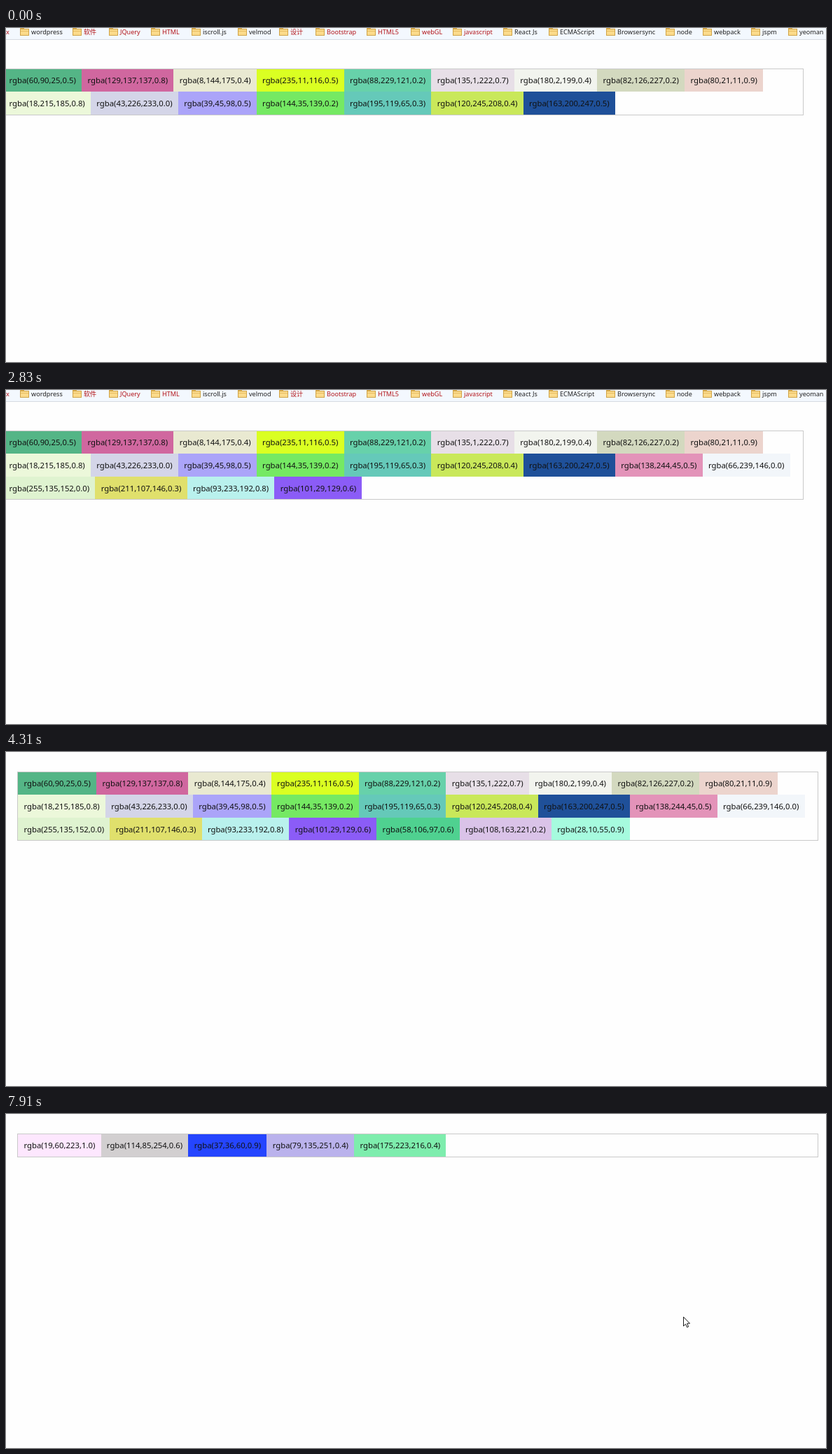
Recreate the animation shown at these times as an HTML page with a canvas. Size 1171 px wide and 478 px high, loop 7990 ms.

```html
<!DOCTYPE html>
<html lang="en">
<head>
<meta charset="utf-8">
<title>Colour tiles</title>
<style>
  html, body { margin: 0; width: 100%; height: 100%; overflow: hidden; background: #fefefe; }
  canvas { display: block; }
</style>
</head>
<body>
<canvas id="stage" width="1171" height="478"></canvas>
<script>
const ctx = document.getElementById('stage').getContext('2d');
const LOOP = 7990;
const SANS = '"Noto Sans", "Noto Sans CJK SC", "Noto Sans CJK", "Open Sans", sans-serif';
const BOX = { left: 16, top: 28, right: 1160 };
const ROW = 32.6;

// Each tile: label, fill, time it appears.
const parseTiles = text => text.trim().split('\n').map(line => {
  const [values, fill, at] = line.trim().split(' ');
  return { label: `rgba(${values})`, fill, at: +at };
});

const firstSet = parseTiles(`
  60,90,25,0.5 #54b586 0
  129,137,137,0.8 #d0679f 0
  8,144,175,0.4 #e9e9d1 0
  235,11,116,0.5 #daff22 0
  88,229,121,0.2 #67d1aa 0
  135,1,222,0.7 #e7dfe7 0
  180,2,199,0.4 #f2f4ee 0
  82,126,227,0.2 #d3d9bf 0
  80,21,11,0.9 #ecd4cd 0
  18,215,185,0.8 #ecf8da 0
  43,226,233,0.0 #d4d5e8 0
  39,45,98,0.5 #aba4f9 0
  144,35,139,0.2 #75e963 0
  195,119,65,0.3 #65c9b9 0
  120,245,208,0.4 #c9e85a 0
  163,200,247,0.5 #1f5099 0
  138,244,45,0.5 #e393b9 250
  66,239,146,0.0 #f2f6fa 800
  255,135,152,0.0 #dff3d0 1340
  211,107,146,0.3 #e0e06c 1810
  93,233,192,0.8 #b9f1ed 2360
  101,29,129,0.6 #8b5cf7 2830
  58,106,97,0.6 #4fd190 3300
  108,163,221,0.2 #dac3e8 3850
  28,10,55,0.9 #a6fbde 4310
  152,187,234,0.7 #d9e2c4 4860`);

const secondSet = parseTiles(`
  19,60,223,1.0 #fde7fe 5820
  114,85,254,0.6 #d2cfd0 6120
  37,36,60,0.9 #2545ff 6490
  79,135,251,0.4 #bab2ec 7050
  175,223,216,0.4 #7eedad 7560`);
const CLEARED_AT = 5670;

// Bookmark folders: x and label; "!" marks a red label.
const bookmarks = [
  [20, 'wordpress'], [95, '!软件'], [147, '!JQuery'], [207, '!HTML'], [265, 'iscroll.js'],
  [331, 'velmod'], [390, '!设计'], [442, '!Bootstrap'], [515, '!HTML5'], [578, '!webGL'],
  [638, '!javascript'], [710, 'React Js'], [775, 'ECMAScript'], [857, 'Browsersync'],
  [942, 'node'], [995, 'webpack'], [1064, 'jspm'], [1117, 'yeoman']
];

// Page offset, held from each time on.
const pageShifts = [
  [0, -21, 30], [3380, -21, 27], [3480, -18, 19], [3580, -9, 9], [3660, -3, 3], [3740, 0, 0]
];

// Pointer strokes: the path is walked in equal steps, then the last place is held.
const strokes = [
  { from: 170, to: 880, steps: 10, path: [[980, 470], [957, 430], [780, 380], [216, 220]] },
  { from: 1340, to: 1500, steps: 3, path: [[200, 150], [190, 60], [180, -20]] },
  { from: 5090, to: 5270, steps: 3, path: [[242, 69], [440, 130], [573, 156]] },
  { from: 5420, to: 5490, steps: 2, path: [[573, 157], [573, 159]] },
  { from: 5820, to: 6200, steps: 6, path: [[568, 166], [517, 180], [525, 212]] },
  { from: 6340, to: 6570, steps: 4, path: [[530, 210], [549, 197]] },
  { from: 6650, to: 6880, steps: 4, path: [[565, 201], [617, 217]] },
  { from: 7050, to: 7840, steps: 11, path: [[640, 222], [800, 265], [967, 289]] },
  { from: 7910, to: 7911, steps: 2, path: [[967, 290], [967, 290]] }
];

const lastBefore = (list, test) => list.filter(test).pop();

function pointerAt(t) {
  const stroke = lastBefore(strokes, s => t >= s.from);
  if (!stroke) return null;
  const { from, to, steps, path } = stroke;
  const n = steps - 1;
  const step = Math.min(n, Math.floor((t - from) / (to - from) * n + 0.03));
  const along = step / n * (path.length - 1);
  const i = Math.min(Math.floor(along), path.length - 2);
  const mix = k => Math.round(path[i][k] + (path[i + 1][k] - path[i][k]) * (along - i));
  return [mix(0), mix(1)];
}

function rect(x, y, w, h, fill) {
  ctx.fillStyle = fill;
  ctx.fillRect(x, y, w, h);
}

function drawFolder(x) {
  rect(x, 0, 6, 3, '#d9ac4c');
  rect(x, 1, 13, 10, '#d0a347');
  rect(x + 1, 2, 11, 8, '#fbdb8b');
  rect(x + 1, 4, 11, 1, '#e6bc62');
}

function drawBar(dx, bottom) {
  if (bottom < 0) return;
  rect(0, 0, 1171, bottom, '#f3f8fe');
  rect(0, bottom, 1171, 1, '#d6dbe1');
  ctx.save();
  ctx.translate(dx, bottom - 16);
  ctx.font = `9.1px ${SANS}`;
  ctx.textAlign = 'left';
  const label = (text, x) => {
    const red = text[0] === '!';
    ctx.fillStyle = red ? '#b3151a' : '#222';
    ctx.fillText(red ? text.slice(1) : text, x, 9);
  };
  label('!x', 0);
  for (const [x, text] of bookmarks) {
    drawFolder(x);
    label(text, x + 16);
  }
  ctx.restore();
}

// Lays tiles out like wrapping inline blocks; all digits share one width.
function layOut(tiles) {
  const start = BOX.left + 1.2;
  let x = start, row = 0;
  const placed = tiles.map(tile => {
    const width = 112 + 6.41 * (tile.label.length - 18);
    if (x + width > BOX.right) { x = start; row++; }
    const spot = { ...tile, x, width, row };
    x += width;
    return spot;
  });
  return { placed, rows: tiles.length ? row + 1 : 0 };
}

function drawBox(tiles) {
  const { placed, rows } = layOut(tiles);
  const edge = row => Math.round(BOX.top + 0.5 + ROW * row);
  const width = BOX.right - BOX.left;
  const height = edge(rows) - BOX.top;
  const line = '#c9c9c9';
  rect(BOX.left, BOX.top, width, 1, line);
  rect(BOX.left, edge(rows), width, 1, line);
  rect(BOX.left, BOX.top, 1, height, line);
  rect(BOX.right - 1, BOX.top, 1, height, line);

  ctx.font = `11.3px ${SANS}`;
  ctx.textAlign = 'center';
  for (const { label, fill, x, width, row } of placed) {
    const left = Math.round(x);
    rect(left, edge(row), Math.round(x + width) - left, edge(row + 1) - edge(row), fill);
    ctx.fillStyle = '#111';
    ctx.fillText(label, x + width / 2, Math.round(BOX.top + 21.4 + ROW * row));
  }
}

const arrow = new Path2D('M.5 .5V13.5L3.5 10.7L5.6 15.3L7.6 14.4L5.6 9.8H9.5Z');
function drawPointer([x, y]) {
  ctx.save();
  ctx.translate(x, y);
  ctx.fillStyle = '#fff';
  ctx.strokeStyle = '#1a1a1a';
  ctx.lineWidth = 1;
  ctx.fill(arrow);
  ctx.stroke(arrow);
  ctx.restore();
}

function draw(t) {
  rect(0, 0, 1171, 478, '#fefefe');
  const [, dx, dy] = lastBefore(pageShifts, s => t >= s[0]);
  drawBar(dx + 21, dy - 14);
  ctx.save();
  ctx.translate(dx, dy);
  drawBox((t < CLEARED_AT ? firstSet : secondSet).filter(tile => t >= tile.at));
  ctx.restore();
  const pointer = pointerAt(t);
  if (pointer) drawPointer(pointer);
}

const began = performance.now();
function tick() {
  draw((performance.now() - began) % LOOP);
  requestAnimationFrame(tick);
}
tick();
</script>
</body>
</html>
```
